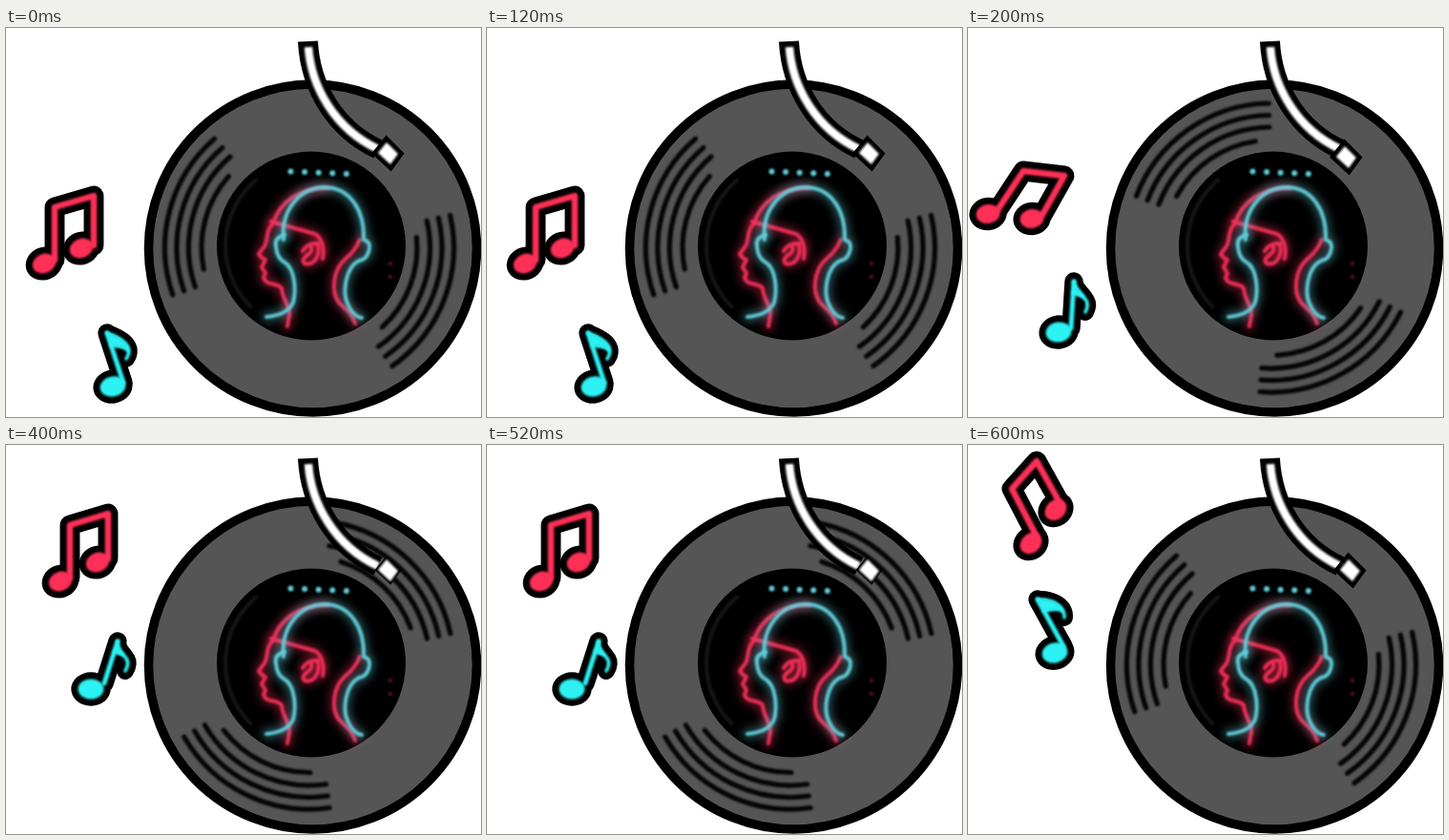
Recreate the animation shown at these times as an HTML page with a canvas. Size 498x408 px, loop 0.8 s.

```html
<!DOCTYPE html>
<html lang="en">
<head>
<meta charset="utf-8">
<title>Spinning record</title>
<style>
html, body { margin: 0; width: 100%; height: 100%; overflow: hidden; background: #fff; }
canvas { display: block; }
</style>
</head>
<body>
<canvas id="stage" width="498" height="408"></canvas>
<script>
const ctx = document.getElementById('stage').getContext('2d');
const RED = '#ff3058', CYAN = '#2cf2f4', NEON_RED = '#f22f58', NEON_CYAN = '#62cdda';
const SOFT = 'blur(0.8px)';
const STEP = 200;

// grooves: middle angle of each group in degrees; tip: cartridge offset and edge width
// pair: two heads under a beam; single: one head, a stem and a flag curve
const poses = [
  { grooves: [195, 21], tip: [0, 0, 5],
    pair: { heads: [[40, 247], [79, 231]], beam: [[51, 188], [92, 176]], feet: [[51, 243], [92, 228]], tilt: -22 },
    single: { head: [112, 376], top: [106, 320], foot: [123, 372], flag: [[121, 325], [135, 334], [126, 347]], tilt: -12 } },
  { grooves: [235, 60.5], tip: [-4, 4, 5],
    pair: { heads: [[21, 195], [67, 200]], beam: [[58, 150], [101, 155]], feet: [[31, 191], [78, 196]], tilt: -8 },
    single: { head: [95, 319], top: [111, 266], foot: [108, 315], flag: [[113, 278], [131, 283], [123, 298]], tilt: -8 } },
  { grooves: [-46.5, 116], tip: [0, 0, 2.5],
    pair: { heads: [[57, 143], [96, 123]], beam: [[67, 84], [107, 72]], feet: [[67, 139], [107, 119]], tilt: -22 },
    single: { head: [89, 256], top: [117, 206], foot: [103, 250], flag: [[116, 219], [134, 222], [125, 237]], tilt: 0 } },
  { grooves: [195, 21], tip: [0, 0, 5],
    pair: { heads: [[66, 103], [92, 68]], beam: [[46, 46], [72, 17]], feet: [[72, 96], [97, 62]], tilt: -42 },
    single: { head: [91, 218], top: [73, 162], foot: [100, 211], flag: [[87, 161], [102, 168], [101, 181]], tilt: -14 } }
];

const rad = deg => deg * Math.PI / 180;

function disc(x, y, r, fill, line, width) {
  ctx.beginPath();
  ctx.arc(x, y, r, 0, 2 * Math.PI);
  ctx.fillStyle = fill;
  ctx.fill();
  if (line) stroke(null, line, width);
}

function stroke(path, color, width) {
  ctx.strokeStyle = color;
  ctx.lineWidth = width;
  path ? ctx.stroke(path) : ctx.stroke();
}

function grooves(mids) {
  ctx.filter = SOFT;
  for (const mid of mids) {
    [151.5, 139, 126.5, 113].forEach((r, i) => {
      const half = i < 3 ? 34 : 26.5;
      ctx.beginPath();
      ctx.arc(318, 230.5, r, rad(mid - half), rad(mid + half));
      stroke(null, '#050505', 5.2);
    });
  }
  ctx.filter = 'none';
}

const redLines = [
  // face
  'M338 168C307 167 286 184 280 205C272 212 275 222 271 229L265 237Q267 241 272 243L268 251L272 257L270 262C273 271 284 266 289 273C290 286 298 291 297 301L295 313',
  // glasses and ear
  'M278 203L324 216C331 220 334 231 332 242',
  'M328 226Q316 225 311 234M327 227C330 238 323 250 313 247Q309 243 316 238Q322 234 320 230',
  // nape
  'M371 222Q366 234 356 242C342 254 341 277 349 288C359 297 363 300 366 310'
].map(d => new Path2D(d));

const cyanLines = [
  'M291 222C288 192 307 167 335 167C360 168 376 190 375 222Q382 224 381 231Q379 243 370 244C355 252 353 278 358 289Q364 303 373 304',
  'M292 217Q281 220 283 229Q284 241 291 245C304 252 304 277 301 288C296 299 284 302 273 303'
].map(d => new Path2D(d));

function neon(lines, color) {
  ctx.save();
  for (const [width, alpha, blur] of [[10, 0.4, 5], [4, 0.95, 1]]) {
    ctx.globalAlpha = alpha;
    ctx.filter = `blur(${blur}px)`;
    for (const line of lines) stroke(line, color, width);
  }
  ctx.restore();
}

function label() {
  disc(320, 228.5, 99, '#000');
  ctx.filter = SOFT;
  ctx.beginPath();
  ctx.arc(320, 228.5, 90, rad(135), rad(230));
  stroke(null, '#161616', 4);
  neon(redLines, NEON_RED);
  neon(cyanLines, NEON_CYAN);
  for (let i = 0; i < 5; i++) disc(298.5 + i * 14.6, 150.5 + i * 0.6, 3, NEON_CYAN);
  disc(403, 247, 2, '#6c1228');
  disc(403, 261, 2, '#6c1228');
  ctx.filter = 'none';
}

const armLine = new Path2D('M317 20C320 62 345 106 390 127');
const armBack = new Path2D('M316.5 14C319 62 345 106 390 127');
const tipShape = new Path2D('M399 120L411 132L403 143L390 131Z');

function arm([dx, dy, edge]) {
  ctx.save();
  ctx.lineCap = 'butt';
  ctx.lineJoin = 'miter';
  stroke(armBack, '#000', 21);
  ctx.filter = SOFT;
  stroke(armLine, '#fff', 8.5);
  ctx.translate(dx, dy);
  ctx.filter = 'none';
  stroke(tipShape, '#000', edge * 2);
  ctx.filter = SOFT;
  ctx.fillStyle = '#fff';
  ctx.fill(tipShape);
  ctx.restore();
}

function noteHead([x, y], tilt, grow, rx, ry) {
  ctx.beginPath();
  ctx.ellipse(x, y, rx + grow, ry + grow, rad(tilt), 0, 2 * Math.PI);
  ctx.fill();
}

function outlined(color, part) {
  for (const [paint, grow, filter] of [['#000', 7.2, 'none'], [color, 0, SOFT]]) {
    ctx.filter = filter;
    ctx.fillStyle = paint;
    part(paint, grow);
  }
  ctx.filter = 'none';
}

function pairNote({ heads, beam, feet, tilt }) {
  outlined(RED, (paint, grow) => {
    ctx.beginPath();
    ctx.moveTo(...feet[0]);
    ctx.lineTo(...beam[0]);
    ctx.lineTo(...beam[1]);
    ctx.lineTo(...feet[1]);
    stroke(null, paint, 6.5 + 2 * grow);
    for (const h of heads) noteHead(h, tilt, grow, 12.5, 10);
  });
}

function singleNote({ head, top, foot, flag, tilt }) {
  const root = top.map((v, i) => v + (foot[i] - v) * 0.25);
  outlined(CYAN, (paint, grow) => {
    ctx.beginPath();
    ctx.moveTo(...foot);
    ctx.lineTo(...top);
    stroke(null, paint, 5 + 2 * grow);
    // flag tapers from the stem to its tip
    ctx.beginPath();
    ctx.moveTo(...top);
    ctx.bezierCurveTo(...flag[0], ...flag[1], ...flag[2]);
    ctx.quadraticCurveTo(...flag[1], ...root);
    ctx.fill();
    stroke(null, paint, 3.5 + 2 * grow);
    noteHead(head, tilt, grow, 13.5, 10.5);
  });
}

function draw(pose) {
  ctx.fillStyle = '#fff';
  ctx.fillRect(0, 0, 498, 408);
  ctx.lineCap = ctx.lineJoin = 'round';
  disc(321.5, 231, 172, '#555', '#000', 9.5);
  grooves(pose.grooves);
  label();
  arm(pose.tip);
  pairNote(pose.pair);
  singleNote(pose.single);
}

const start = performance.now();
let shown = -1;

function tick(now) {
  const i = Math.floor(Math.max(0, now - start) / STEP) % poses.length;
  if (i !== shown) draw(poses[shown = i]);
  requestAnimationFrame(tick);
}

tick(start);
</script>
</body>
</html>
```
